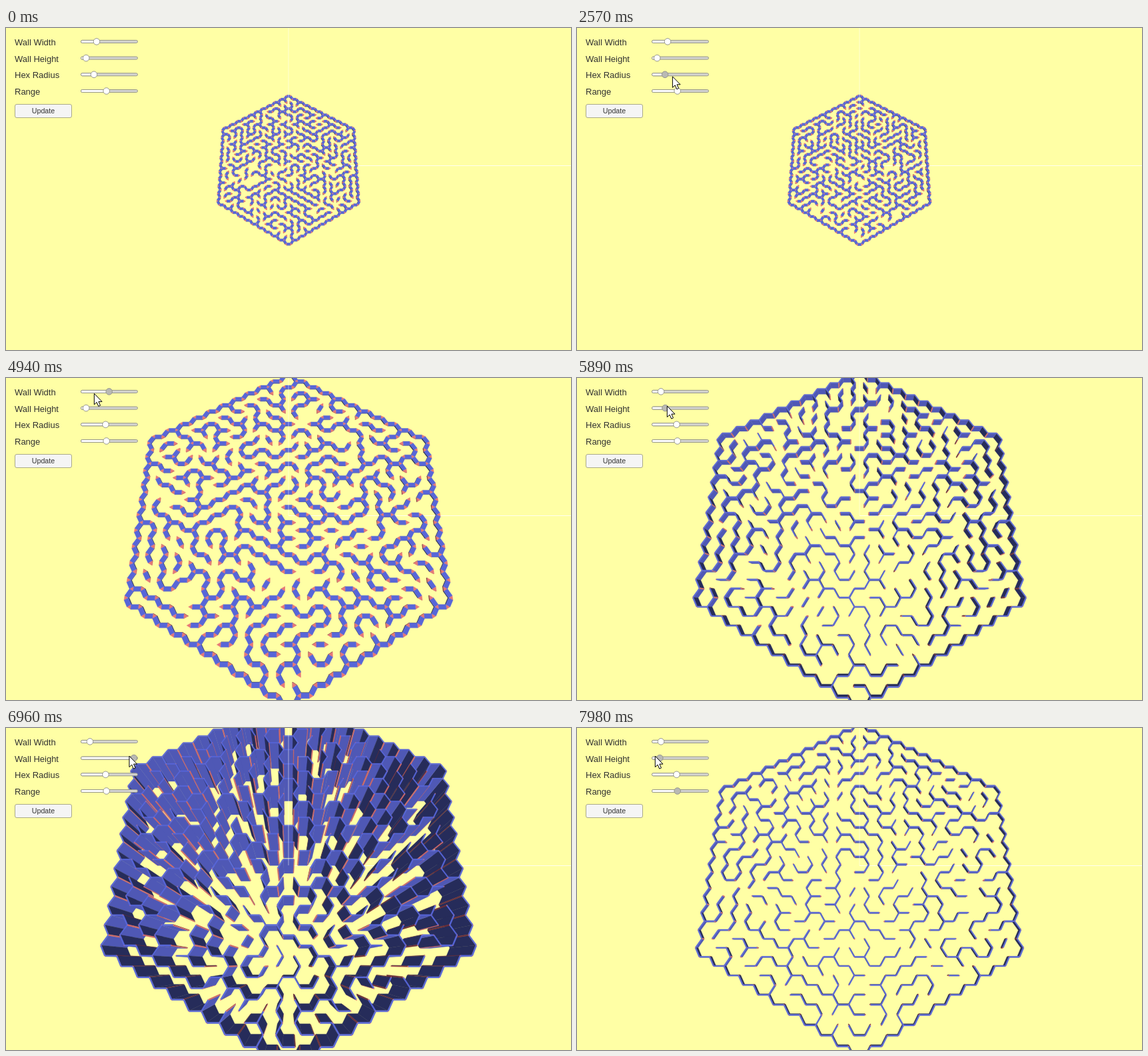
An HTML page with a canvas for the animation above (8000 ms loop, 848x483 px).

```html
<!DOCTYPE html>
<html lang="en">
<head>
<meta charset="utf-8">
<title>Hex maze</title>
<style>
html, body { margin: 0; width: 100%; height: 100%; overflow: hidden; background: #ffffa5; }
canvas, svg { position: absolute; left: 0; top: 0; }
text { font: 13px "Liberation Sans", Arial, sans-serif; fill: #323232; }
.button { font-size: 10.7px; text-anchor: middle; }
.knob { stroke: #96968a; }
</style>
</head>
<body>
<canvas id="view" width="848" height="483"></canvas>
<svg id="ui" width="848" height="483">
  <rect x="13.5" y="114.5" width="85" height="20" rx="2.5" fill="#f5f5f5" stroke="#aaaa88"/>
  <text class="button" x="56" y="128">Update</text>
  <path id="cursor" d="M0 0V16.5L3.8 13L6.4 19L9.2 17.8L6.6 12H11.7Z" fill="#fff" stroke="#000"/>
</svg>
<script>
const ctx = document.getElementById('view').getContext('2d');
const ui = document.getElementById('ui');
const cursor = document.getElementById('cursor');
const LOOP = 8000, STEP = 50, RANGE = 10, ZERO = 117.3, YELLOW = '#ffffa5';
const SQ3 = Math.sqrt(3);

// Each slider: label, cursor offset while dragging, drag as [time, knob x]
const sliders = {
  width: { label: 'Wall Width', grip: [2.5, 3], keys: [[3260, 136], [3450, 121], [3750, 169],
    [4150, 169], [4450, 150], [4750, 169], [4900, 169], [5150, 120.5], [5400, 126]] },
  height: { label: 'Wall Height', grip: [-7, -3], keys: [[5810, 120.2], [6100, 146], [6450, 146],
    [6940, 192], [7040, 192], [7700, 126], [7880, 126], [7940, 124.3]] },
  radius: { label: 'Hex Radius', grip: [3, 3], keys: [[960, 132], [1250, 120.5], [1700, 154],
    [1780, 154], [2060, 121], [2440, 121], [2900, 149.5]] },
  range: { label: 'Range', keys: [[LOOP, 150.7]] }
};
// When the cursor travels to each slider
const visits = [[30, 580, 'radius'], [3020, 3230, 'width'], [5430, 5760, 'height']];

const mix = (a, b, u) => a + (b - a) * u;
const easeOut = u => 1 - (1 - u) ** 2;

function knobAt({ keys }, t) {
  const i = keys.findIndex(k => k[0] > t);
  if (i === 0) return keys[0][1];
  if (i < 0) return keys[keys.length - 1][1];
  const [t0, a] = keys[i - 1], [t1, b] = keys[i];
  return mix(a, b, easeOut((t - t0) / (t1 - t0)));
}

// The knob lags 100 ms behind the cursor
function cursorAt(t) {
  let pos = [740, 470];
  for (const [from, to, name] of visits) {
    const s = sliders[name], u = easeOut(Math.min(1, Math.max(0, (t - from) / (to - from))));
    pos = [mix(pos[0], knobAt(s, t + 100) + s.grip[0], u), mix(pos[1], s.y + s.grip[1], u)];
  }
  return pos;
}

function add(tag, attrs) {
  const el = document.createElementNS('http://www.w3.org/2000/svg', tag);
  for (const k in attrs) el.setAttribute(k, attrs[k]);
  ui.insertBefore(el, cursor);
  return el;
}
Object.values(sliders).forEach((s, i) => {
  const y = s.y = 20.4 + i * 24.7;
  const bar = { x: 112.5, y: y - 2, height: 4, rx: 2, stroke: '#96968a' };
  add('text', { x: 13, y: y + 5.6 }).textContent = s.label;
  add('rect', { ...bar, width: 85, fill: '#d4d4d0' });
  s.fill = add('rect', { ...bar, fill: '#fff' });
  s.knob = add('circle', { class: 'knob', cy: y, r: 4.8 });
});

function setSlider(s, t) {
  const x = knobAt(s, t), first = s.keys[0][0], end = s.keys[s.keys.length - 1][0];
  const held = t > first - 100 && t < end + 50;
  s.fill.setAttribute('width', x - 112.5);
  s.knob.setAttribute('cx', x);
  s.knob.setAttribute('fill', held ? '#b9b9b4' : '#fff');
  return x - ZERO;
}

// Maze on flat-top hex cells: carved depth first, then a few more walls knocked out
const DIRS = [[1, 0], [0, 1], [-1, 1], [-1, 0], [0, -1], [1, -1]];
const inside = (q, r) => Math.max(Math.abs(q), Math.abs(r), Math.abs(q + r)) <= RANGE;
const id = (q, r) => (q + 20) * 50 + r + 20;

function random(seed) {
  return () => {
    seed = seed + 0x6D2B79F5 | 0;
    let x = Math.imul(seed ^ seed >>> 15, 1 | seed);
    x = x + Math.imul(x ^ x >>> 7, 61 | x) ^ x;
    return ((x ^ x >>> 14) >>> 0) / 4294967296;
  };
}

function carve(rnd) {
  const seen = new Set([id(0, 0)]), open = new Set(), stack = [[0, 0]];
  while (stack.length) {
    const [q, r] = stack[stack.length - 1];
    const free = DIRS.map(([dq, dr], i) => [q + dq, r + dr, i])
      .filter(([a, b]) => inside(a, b) && !seen.has(id(a, b)));
    if (!free.length) { stack.pop(); continue; }
    const [a, b, i] = free[Math.floor(rnd() * free.length)];
    open.add(id(q, r) * 6 + i).add(id(a, b) * 6 + (i + 3) % 6);
    seen.add(id(a, b));
    stack.push([a, b]);
  }
  return open;
}

// Camera above the maze, tilted 15 degrees from straight down
const F = 418.3, C = Math.cos(Math.PI / 12), S = Math.sin(Math.PI / 12), CENTER_Z = 0.362;
function project([x, z], h) {
  const H = 1 - h, d = H * C + z * S;
  return [424 + F * x / d, 241.5 - F * (z * C - H * S) / d];
}
const polar = ([x, z], deg, len) =>
  [x + len * Math.cos(deg * Math.PI / 180), z + len * Math.sin(deg * Math.PI / 180)];

function polygon(points, color) {
  ctx.beginPath();
  points.forEach(p => ctx.lineTo(...p));
  ctx.closePath();
  ctx.fillStyle = ctx.strokeStyle = color;
  ctx.fill();
  ctx.stroke();
}

const BLUE = { top: '#5766d8', lit: '#4f58b5', dark: '#262c5a' };
const RED = { top: '#e67878', lit: '#cd6868', dark: '#6b2f38' };

function drawMaze(R, w, h, seed) {
  const rnd = random(seed), open = carve(rnd), posts = new Map(), sides = [], walls = [];
  const side = (a, b, paint) => {
    const nx = b[1] - a[1], nz = a[0] - b[0];
    if (nx * a[0] + nz * a[1] >= 0) return;
    const lit = nx * 0.321 - nz * 0.557 > 0.05 * Math.hypot(nx, nz);
    sides.push({ a, b, color: lit ? paint.lit : paint.dark, far: Math.hypot(a[0] + b[0], a[1] + b[1]) });
  };
  const post = (p, deg) => {
    const key = Math.round(p[0] / R * 2) + ',' + Math.round((p[1] - CENTER_Z) / R * 2 / SQ3);
    if (!posts.has(key)) posts.set(key, { p, deg, used: new Set() });
    posts.get(key).used.add((deg + 360) % 360);
  };

  for (let q = -RANGE; q <= RANGE; q++) for (let r = -RANGE; r <= RANGE; r++) {
    if (!inside(q, r)) continue;
    const cell = [1.5 * q * R, SQ3 * R * (r + q / 2) + CENTER_Z];
    DIRS.forEach(([dq, dr], i) => {
      const shared = inside(q + dq, r + dr);
      if (open.has(id(q, r) * 6 + i) || (shared && (i > 2 || rnd() < 0.12))) return;
      const a = polar(cell, i * 60, R), b = polar(cell, i * 60 + 60, R);
      const along = i * 60 + 120, gap = w / 2 / SQ3;
      post(a, along);
      post(b, along + 180);
      const a2 = polar(a, along, gap), b2 = polar(b, along + 180, gap);
      const quad = [polar(a2, along - 90, w / 2), polar(b2, along - 90, w / 2),
        polar(b2, along + 90, w / 2), polar(a2, along + 90, w / 2)];
      side(quad[0], quad[1], BLUE);
      side(quad[2], quad[3], BLUE);
      walls.push(quad);
    });
  }
  const caps = [...posts.values()].map(({ p, deg, used }) => {
    const tri = [-60, 60, 180].map(d => polar(p, deg + d, w / SQ3));
    tri.forEach((c, k) => {
      if (!used.has((deg + k * 120) % 360)) side(c, tri[(k + 1) % 3], RED);
    });
    return tri;
  });

  const top = (points, color) => polygon(points.map(p => project(p, h)), color);
  ctx.lineWidth = 0.4;
  sides.sort((m, n) => n.far - m.far).forEach(({ a, b, color }) =>
    polygon([project(a, 0), project(b, 0), project(b, h), project(a, h)], color));
  caps.forEach(tri => top(tri, RED.top));
  walls.forEach(quad => top(quad, BLUE.top));
}

let last = '';
function frame() {
  const now = performance.now() % LOOP;
  const t = Math.max(0, Math.floor((now + 10) / STEP) * STEP - 10);
  const [width, height, radius] = Object.values(sliders).map(s => setSlider(s, t));
  cursor.setAttribute('transform', `translate(${cursorAt(t)})`);
  cursor.style.display = t < 30 ? 'none' : '';

  const state = [width, height, radius].join();
  if (state !== last) {
    last = state;
    ctx.fillStyle = YELLOW;
    ctx.fillRect(0, 0, 848, 483);
    ctx.fillStyle = 'rgba(255,255,255,.8)';
    ctx.fillRect(424, 206, 424, 1);
    const seed = Math.round(width * 971 + height * 3571 + radius * 7919);
    drawMaze(radius * 0.001105, width * 0.00043, height * 0.00187, seed);
    ctx.fillStyle = 'rgba(255,255,255,.5)';
    ctx.fillRect(423.5, 0, 1, 206);
  }
  requestAnimationFrame(frame);
}
frame();
</script>
</body>
</html>
```
